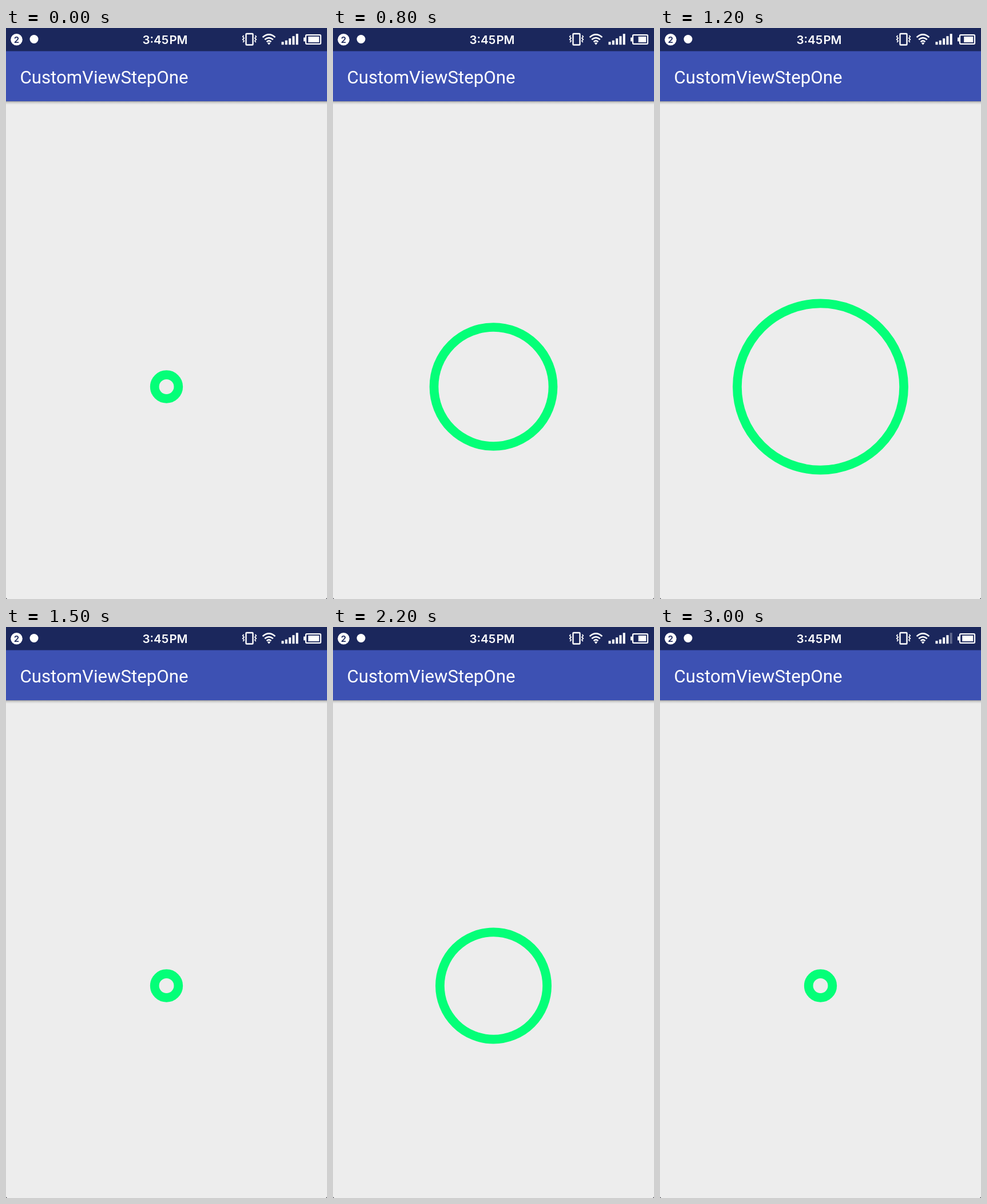
Animation of 561 by 998 pixels, one loop 3100 ms. Source, as an HTML page:

```html
<!DOCTYPE html>
<html lang="en">
<head>
<meta charset="utf-8">
<title>CustomViewStepOne</title>
<style>
  html, body { margin: 0; width: 100%; height: 100%; overflow: hidden; background: #3a3a44; }
  svg { display: block; width: 561px; height: 998px; }
  .title { font: 400 31.2px Roboto, sans-serif; }
  .clock { font: 600 20.5px Inter, sans-serif; }
  .badge { font: 600 15px Inter, sans-serif; }
  .line { fill: none; stroke: #fff; }
</style>
</head>
<body>
<svg viewBox="0 0 561 998">
  <defs>
    <linearGradient id="shade" x2="0" y2="1">
      <stop offset="0" stop-color="#000" stop-opacity=".34"/>
      <stop offset=".4" stop-color="#000" stop-opacity=".12"/>
      <stop offset="1" stop-color="#000" stop-opacity="0"/>
    </linearGradient>
  </defs>

  <path fill="#ededed" d="M0 0H561V996L559 998H2L0 996Z"/>
  <rect y="128" width="561" height="6" fill="url(#shade)"/>
  <rect width="561" height="41" fill="#1b275c"/>
  <rect y="40.5" width="561" height="87.5" fill="#3d51b3"/>

  <g fill="#fff">
    <text class="title" x="24.5" y="97">CustomViewStepOne</text>
    <text class="clock" x="284.3" y="28" text-anchor="end">3:45</text>
    <text class="clock" x="285.4" y="28">PM</text>
    <circle cx="18.5" cy="20.3" r="10.3"/>
    <text class="badge" x="18.5" y="25.7" text-anchor="middle" style="fill:#1b275c">2</text>
    <circle cx="49" cy="19.5" r="7.5"/>
  </g>

  <!-- vibrate -->
  <rect class="line" x="419.5" y="10" width="12" height="19.5" rx="1" stroke-width="2.4"/>
  <path class="line" stroke-width="1.7" d="M415.5 13l-1.8 2.3 2.4 2.4-2.4 2.4 2.4 2.4-1.8 2.5M435.5 13l1.8 2.3-2.4 2.4 2.4 2.4-2.4 2.4 1.8 2.5"/>

  <!-- wifi -->
  <g class="line" stroke-width="2.6">
    <path d="M448.6 16.3Q459.5 6.6 470.4 16.3"/>
    <path d="M452.2 20.3Q459.5 13.8 466.8 20.3"/>
    <path d="M455.6 24.2Q459.5 20.6 463.4 24.2"/>
  </g>
  <path fill="#fff" d="M456.7 26.3Q459.5 24 462.3 26.3L459.5 29.5Z"/>

  <g id="bars" fill="#fff"></g>

  <!-- battery -->
  <rect class="line" x="524" y="12.2" width="26" height="15.6" rx="1.5" stroke-width="2.2"/>
  <rect x="520" y="16.5" width="3.2" height="7" rx="1" fill="#fff"/>
  <rect id="charge" y="15" height="10" fill="#fff"/>

  <circle id="ring" cx="280.5" cy="627" fill="none" stroke="#04ff78" stroke-width="15.7"/>
</svg>
<script>
const LOOP = 3100, STEP = 100, COUNT = 15, GROW = 10.4;
const byId = id => document.getElementById(id);
const set = (el, attrs) => {
  for (const key in attrs) el.setAttribute(key, attrs[key]);
  return el;
};

const bars = [5, 7.5, 11, 15, 19].map((height, i) => {
  const bar = document.createElementNS('http://www.w3.org/2000/svg', 'rect');
  byId('bars').append(bar);
  return set(bar, { x: 481.5 + i * 6.3, y: 29.2 - height, width: 4, height });
});

const chargeWidth = phase =>
  phase < 500 || phase >= 1300 ? 19 : phase < 900 ? 13.5 : 16;

function draw(time) {
  const step = Math.floor(time / STEP);
  const radius = (step + 2) % COUNT * GROW;
  set(byId('ring'), { r: radius, visibility: radius ? 'visible' : 'hidden' });

  const width = chargeWidth(step * STEP % 1500);
  set(byId('charge'), { x: 547.2 - width, width });
  set(bars[4], { opacity: time < 2500 ? 1 : 0.3 });
}

const start = performance.now();
function tick() {
  draw((performance.now() - start) % LOOP);
  requestAnimationFrame(tick);
}
tick();
</script>
</body>
</html>
```
